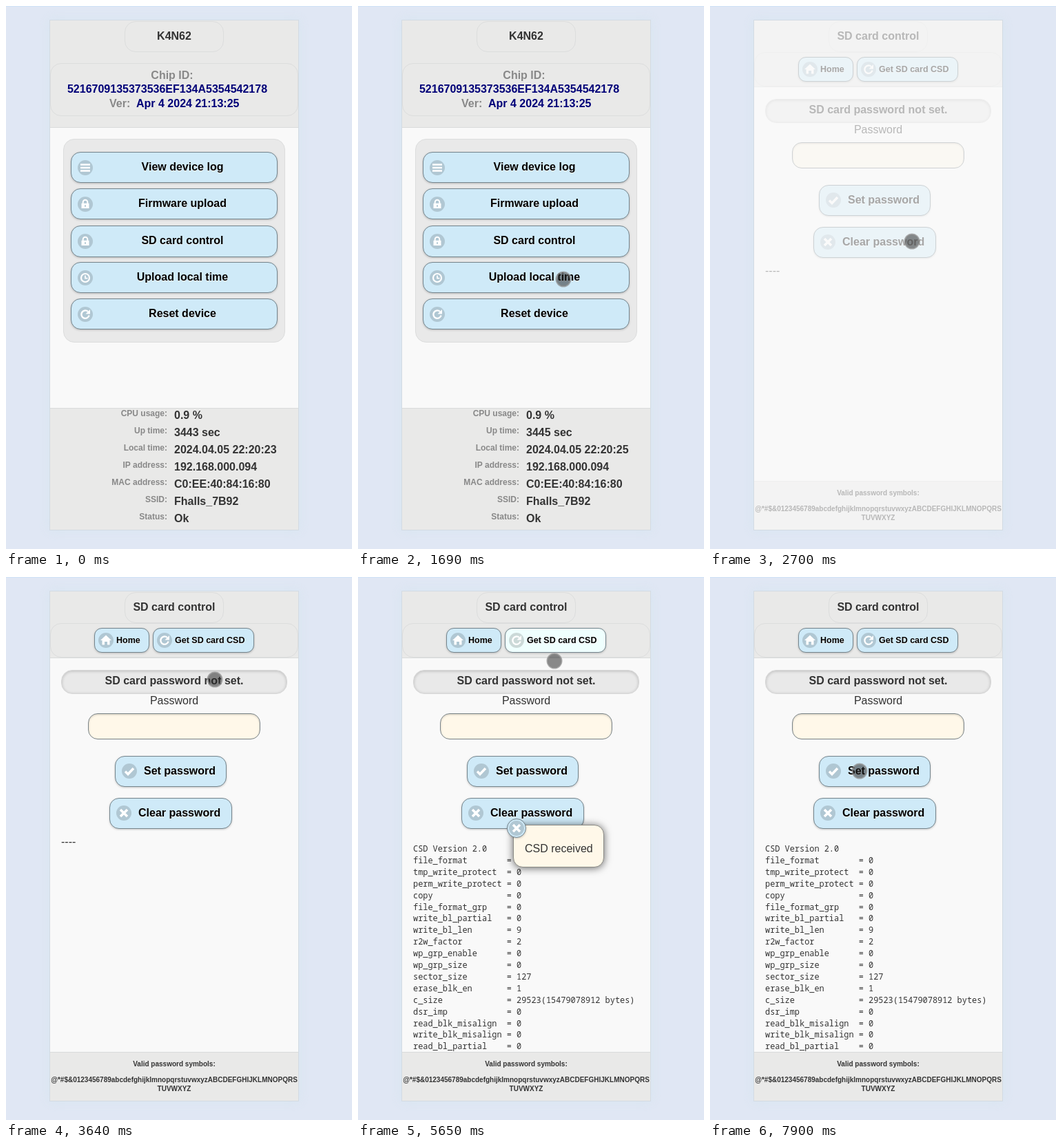
An HTML page that plays this animation: 502 by 789 pixels, repeating every 7.99 s.

```html
<!DOCTYPE html>
<html lang="en">
<head>
<meta charset="utf-8">
<title>Device control panel</title>
<style>
  html, body { margin: 0; width: 100%; height: 100%; overflow: hidden; background: #e0e7f4; }
  #stage, .layer, .layer svg { position: absolute; left: 0; top: 0; width: 502px; height: 789px; overflow: hidden; }
  .box { position: absolute; box-sizing: border-box; }
  .frame { background: #f9f9f9; border: 1px solid #d3dbe3; box-shadow: 0 0 14px rgba(205, 228, 238, .45); }
  .bar { background: #e9e9e8; border: 0 solid #d9dbdb; }
  .outline { border: 1px solid #dcdddd; border-radius: 16px; }
  .panel { background: #e9e9e9; }
  .button { background: #cfeaf8; border: 1px solid #75858d; border-radius: 14px; box-shadow: 0 1px 3px rgba(0, 0, 0, .2); }
  .small { border-radius: 11px; }
  .active { background: #b80b0b; border-color: #f01818; }
  .focus { background: #effffe; }
  .status { background: #e9e9e9; border: 1px solid #d6d6d6; border-radius: 16px; box-shadow: inset 0 1px 4px rgba(0, 0, 0, .2); }
  .input { background: #fff8e9; border: 1px solid #7b8589; border-radius: 14px; box-shadow: inset 0 1px 3px rgba(0, 0, 0, .2); }
  .popup { background: #fff8e9; border: 1px solid #8b8b86; border-radius: 14px; box-shadow: 0 1px 12px rgba(0, 0, 0, .6); }
  text { font: bold 16px Arial, "Liberation Sans", sans-serif; fill: #333; white-space: pre; }
  .plain { font-weight: normal; }
  .grey { fill: #888; }
  .navy { fill: #000078; }
  .label { font-size: 12px; fill: #888; }
  .hint { font-size: 10px; }
  .caption { fill: #000; text-shadow: 0 1px 0 #f3f3f3; }
  .mini { font-size: 12.5px; }
  .lit { fill: #fff; text-shadow: 0 1px 0 #500; }
  .mono { font: 11.92px "Noto Sans Mono", monospace; }
</style>
</head>
<body>
<div id="stage"></div>
<script>
const LOOP = 7990, TICK = 77.5;
const stage = document.getElementById('stage');

const icons = {
  bars: '<path d="M-7-4.5H7M-7 0H7M-7 4.5H7" stroke-width="2.4"/>',
  lock: '<path d="M-3.3-1V-3a3.3 3.3 0 0 1 6.6 0v2" stroke-width="2"/><path d="M-5.5-1.2h11V6h-11zM-.8 1v3H.8V1z" fill="#fff" stroke="none"/>',
  clock: '<circle r="6" stroke-width="2.2"/><path d="M0-3.5V.6H3.4" stroke-width="1.7"/>',
  refresh: '<path d="M4-4A5.7 5.7 0 1 0 5.6 1.5" stroke-width="2.4"/><path d="M7-7v6.5H.5z" fill="#fff" stroke="none"/>',
  home: '<path d="M0-7.5 8 0H5.5V6.5H2V2H-2V6.5H-5.5V0H-8z" fill="#fff" stroke="none"/>',
  check: '<path d="M-6 .5-2 4.5 6-4" stroke-width="3.5"/>',
  cross: '<path d="M-5-5 5 5M5-5-5 5" stroke-width="3.6"/>'
};

const csd = `file_format 0,tmp_write_protect 0,perm_write_protect 0,copy 0,file_format_grp 0,write_bl_partial 0,write_bl_len 9,r2w_factor 2,wp_grp_enable 0,wp_grp_size 0,sector_size 127,erase_blk_en 1,c_size 29523(15479078912 bytes),dsr_imp 0,read_blk_misalign 0,write_blk_misalign 0,read_bl_partial 0`
  .split(',').map(row => row.replace(/^(\S+) /, (_, name) => name.padEnd(18) + ' = '));

// Pointer path: tick, x, y
const path = [
  [13, 394, 785], [16, 343, 616], [19, 312, 488], [22, 298, 397], [24, 294, 362], [27, 293, 342],
  [43, 293, 342], [44, 301, 281], [45, 312, 227], [46, 314, 183], [47, 303, 149], [48, 300, 123], [50, 295, 95], [52, 293, 88],
  [72, 293, 88], [73, 285, 122], [76, 258, 238], [79, 236, 331], [81, 232, 355], [82, 232, 356], [85, 231, 364],
  [96, 231, 364], [99, 224, 326], [102, 217, 282], [104, 215, 276]
];
const pressed = [[30, 32], [58, 60], [87, 90]];

let boxes, marks;

function layer(draw, opacity = 1) {
  boxes = marks = '';
  draw();
  return `<div class="layer" style="opacity:${opacity}">${boxes}<svg>${marks}</svg></div>`;
}

// Edges: left, top, right, bottom
function box(l, t, r, b, cls, css = '') {
  boxes += `<div class="box ${cls}" style="left:${l}px;top:${t}px;width:${r - l}px;height:${b - t}px;${css}"></div>`;
}

function text(x, y, str, cls = '', anchor = 'start') {
  marks += `<text x="${x}" y="${y}" class="${cls}" text-anchor="${anchor}">${str.replace(/&/g, '&amp;')}</text>`;
}

const centred = (x, y, str, cls) => text(x, y, str, cls, 'middle');

function icon(x, y, name, shade = .15, r = 11) {
  marks += `<g transform="translate(${x} ${y})" fill="none" stroke="#fff"><circle r="${r}" fill="#000" fill-opacity="${shade}" stroke="none"/>${icons[name]}</g>`;
}

function header(title, bottom, inner) {
  box(64, 21, 424, bottom, 'bar', 'border-bottom-width:1px');
  box(172, 22, 316, 67, 'outline');
  box(64, ...inner, 'outline');
  centred(244, 49, title);
}

function homePage(k) {
  header('K4N62', 177, [83, 424, 160]);
  centred(241, 106, 'Chip ID:', 'grey');
  centred(234, 126, '5216709135373536EF134A5354542178', 'navy');
  text(150, 147, 'Ver:', 'grey');
  text(189, 147, 'Apr 4 2024 21:13:25', 'navy');

  box(83, 193, 405, 489, 'outline panel');
  [['View device log', 'bars'], ['Firmware upload', 'lock'], ['SD card control', 'lock'],
   ['Upload local time', 'clock'], ['Reset device', 'refresh']].forEach(([label, name], i) => {
    const y = Math.round(212 + i * 53.25), active = i === 2 && k >= 32;
    box(94, y, 394, y + 45 + (i === 2), 'button ' + (active ? 'active' : ''));
    icon(115, y + 23, name, active ? .35 : .15);
    centred(256, y + 27, label, active ? 'lit' : 'caption');
  });

  box(64, 584, 424, 761, 'bar', 'border-top-width:1px');
  const seconds = Math.floor((k + 12) / 13);
  [['CPU usage', '0.9 %'], ['Up time', `${3443 + seconds} sec`], ['Local time', `2024.04.05 22:20:${23 + seconds}`],
   ['IP address', '192.168.000.094'], ['MAC address', 'C0:EE:40:84:16:80'],
   ['SSID', 'Fhalls_7B92'], ['Status', 'Ok']].forEach(([label, value], i) => {
    text(234, 596 + i * 25, label + ':', 'label', 'end');
    text(244, 600 + i * 25, value);
  });
}

function cardPage(k) {
  header('SD card control', 118, [67, 424, 117]);
  box(128, 74, 208, 110, 'button small');
  icon(145, 92, 'home');
  text(160, 96, 'Home', 'caption mini');
  box(213, 74, 360, 110, 'button small ' + (k >= 60 && k < 90 ? 'focus' : ''));
  icon(230, 92, 'refresh');
  text(245, 96, 'Get SD card CSD', 'caption mini');

  box(80, 135, 408, 170, 'status');
  centred(244, 156, 'SD card password not set.');
  centred(244, 185, 'Password', 'plain');
  box(119, 198, 369, 236, 'input');
  box(158, 260, 320, 305, 'button');
  icon(179, 282, 'check');
  text(200, 287, 'Set password', 'caption');
  box(150, 321, 328, 366, 'button');
  icon(171, 343, 'cross');
  text(192, 348, 'Clear password', 'caption');

  if (k < 60) text(80, 390, '----', 'plain');
  else ['CSD Version 2.0', ...csd].forEach((row, i) => text(80, 399 + i * 16.9, row, 'mono'));

  box(64, 690, 424, 761, 'bar', 'border-top-width:1px');
  centred(244, 711, 'Valid password symbols:', 'hint');
  centred(244, 734, '@*#$&0123456789abcdefghijklmnopqrstuvwxyzABCDEFGHIJKLMNOPQRS', 'hint');
  centred(244, 747, 'TUVWXYZ', 'hint');
}

function popup() {
  box(225, 360, 357, 422, 'popup');
  box(216, 351, 244, 379, 'button', 'border-radius:50%');
  icon(230, 365, 'cross', .15, 11);
  text(242, 400, 'CSD received', 'plain');
}

function pointer(k) {
  const next = path.findIndex(p => p[0] > k);
  if (next < 1) return;
  const [k0, x0, y0] = path[next - 1], [k1, x1, y1] = path[next];
  const f = (k - k0) / (k1 - k0);
  const down = pressed.some(([a, b]) => k >= a && k < b);
  marks += `<circle cx="${x0 + (x1 - x0) * f}" cy="${y0 + (y1 - y0) * f}" r="10.3" fill="#222" fill-opacity="${down ? .65 : .52}" stroke="#8a8a8a" stroke-opacity=".7" stroke-width="2.4"/>`;
}

function render(k) {
  let html = layer(() => {
    box(0, 0, 502, 1, '', 'background:#d0e3f7');
    box(63, 20, 425, 762, 'frame');
  });
  if (k < 35) html += layer(() => homePage(k), k < 34 ? 1 : .3);
  else html += layer(() => cardPage(k), Math.min(1, (k - 33.7) / 4));
  if (k >= 61 && k < 90) html += layer(popup);
  stage.innerHTML = html + layer(() => pointer(k));
}

let shown = -1;
function tick() {
  const k = Math.floor((performance.now() % LOOP + 25) / TICK);
  if (k !== shown) render(shown = k);
  requestAnimationFrame(tick);
}
tick();
</script>
</body>
</html>
```
